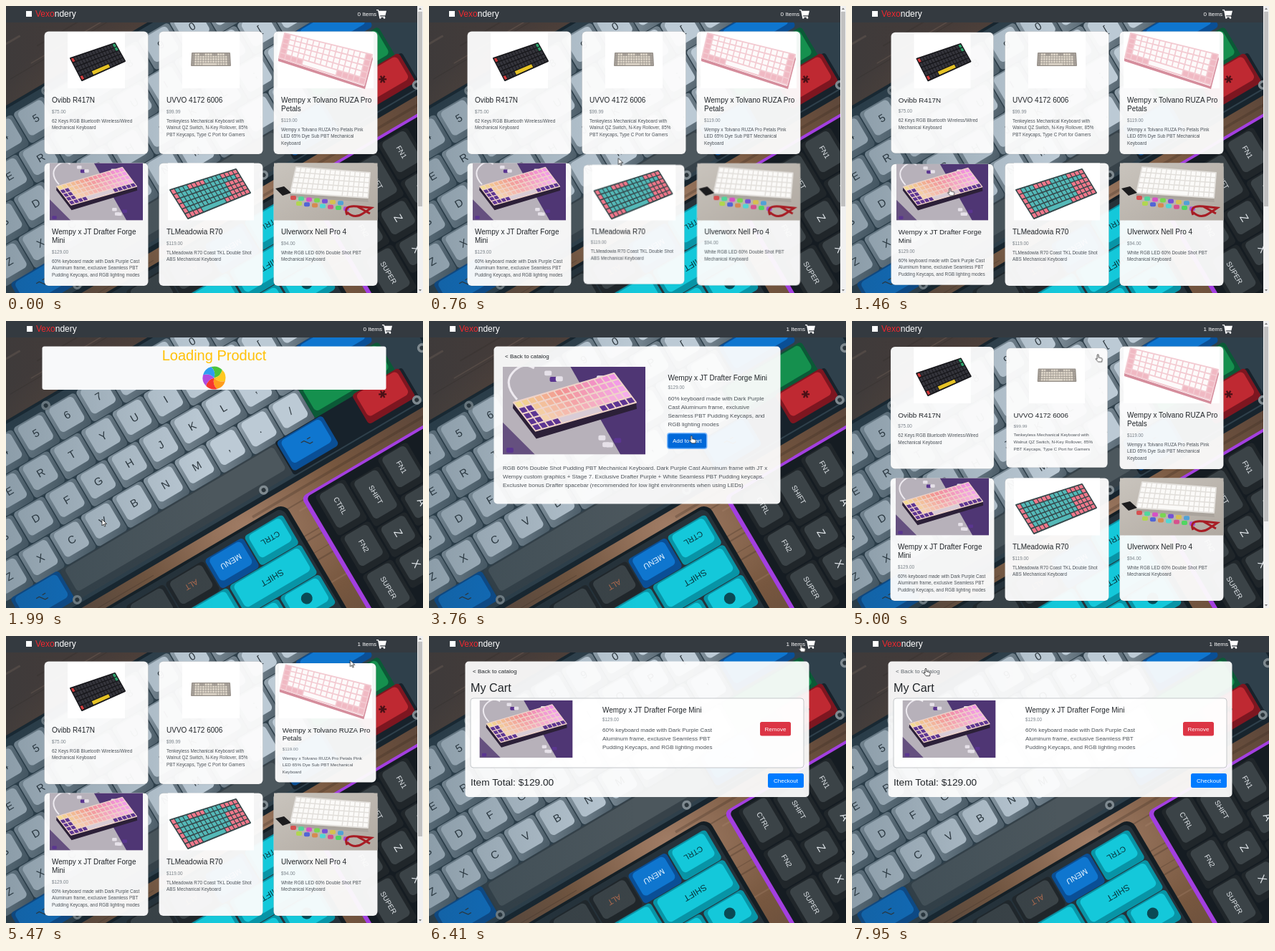
Animation, 582 px wide and 401 px high, one loop 8000 ms. Source, as an HTML page:

```html
<!DOCTYPE html>
<html lang="en">
<head>
<meta charset="utf-8">
<title>Keyboard shop</title>
<style>
  html, body { margin: 0; width: 100%; height: 100%; overflow: hidden; }
  svg { display: block; font-family: "Liberation Sans", Arial, sans-serif; }
  .card { transform-box: fill-box; transform-origin: center; }
  .legend { text-anchor: middle; font-family: "Liberation Sans", "DejaVu Sans", sans-serif; }
</style>
</head>
<body>
<svg id="stage" width="582" height="401" viewBox="0 0 582 401"></svg>
<script>
const LOOP = 8000, ADDED = 3190;
const INK = '#212529', BODY = '#4d5359', MUTED = '#7b838a';

// ---- drawing helpers ----
const rect = (x, y, w, h, fill, r = 0, extra = '') =>
  `<rect x="${x}" y="${y}" width="${w}" height="${h}" rx="${r}" fill="${fill}" ${extra}/>`;
const poly = (points, fill, extra = '') => `<polygon points="${points}" fill="${fill}" ${extra}/>`;
const circle = (x, y, r, fill) => `<circle cx="${x}" cy="${y}" r="${r}" fill="${fill}"/>`;
const text = (x, y, s, size, fill = INK, extra = '') =>
  `<text x="${x}" y="${y}" font-size="${size}" fill="${fill}" ${extra}>${s}</text>`;
const lines = (x, y, step, rows, size, fill) =>
  rows.map((s, i) => text(x, y + i * step, s, size, fill)).join('');
const group = (id, content, cls = '') => `<g id="${id}" class="${cls}">${content}</g>`;
const repeat = (n, draw) => Array.from({ length: n }, (_, i) => draw(i)).join('');
const gradient = (id, from, to) => `<linearGradient id="${id}" x2="1" y2="1">
  <stop stop-color="${from}"/><stop offset="1" stop-color="${to}"/></linearGradient>`;

let seed = 7;
const random = (min, max) => {
  seed = seed * 16807 % 2147483647;
  return +(min + seed / 2147483647 * (max - min)).toFixed(1);
};

// A keyboard seen in perspective: corners run clockwise from the top left.
function board([a, b, c, d], base, paint, rows = 5, cols = 15) {
  const at = (u, v) => [0, 1].map(k =>
    ((1 - v) * ((1 - u) * a[k] + u * b[k]) + v * ((1 - u) * d[k] + u * c[k])).toFixed(1)).join();
  let out = poly([a, b, c, d].join(' '), base, `stroke="${base}" stroke-width="2" stroke-linejoin="round"`);
  for (let r = 0; r < rows; r++) {
    const last = r === rows - 1;
    for (let i = 0; i < cols; i++) {
      const space = last && i === 4, next = space ? 10 : i + 1;
      const u0 = (i + .1) / cols, u1 = (next - .1) / cols, v0 = (r + .1) / rows, v1 = (r + .88) / rows;
      out += poly([at(u0, v0), at(u1, v0), at(u1, v1), at(u0, v1)].join(' '),
        paint({ r, i, last, space, end: next === cols }));
      i = next - 1;
    }
  }
  return out;
}

// ---- desk backdrop, laid out on one tilted grid ----
const PITCH = 50.6;
const GREY = ['url(#greySide)', '#bccad5'], BLUE = ['#0a4f96', '#0f76cf'], TEAL = ['#0894a6', '#14c8da'],
  GREEN = ['#0b5a37', '#15904e'], RED = ['#7d1620', '#bf2932'], DARK = ['#20262a', '#3b4347'];

function key(u, v, w, h, [side, top], label = '', ink = '#2e383f', size = 15, turn = 0) {
  return rect(u - w / 2, v - h / 2, w, h, side, 5) +
    rect(u - w / 2 + 5, v - h / 2 + 2, w - 10, h - 11, top, 6) +
    (label && text(0, size * .36, label, size, ink,
      `class="legend" transform="translate(${u} ${v - 3}) rotate(${turn})"`));
}
function greyBoard() {
  const stagger = [0, .56, .81, 1.36];
  const plate = rect(-260, 120, 750, 279, '#17242d', 10) + rect(-260, 124, 746, 268, '#2f404b', 8);
  const letters = ['1234567890-=', 'QWERTYUIOP[]', "ASDFGHJKL;'", 'ZXCVBNM,./'].map((row, r) =>
    [...row].map((label, i) => key(-246 + (i + stagger[r]) * PITCH, 159 + r * 51.2, 49, 50, GREY, label)).join(''));
  const screw = (u, v) => circle(u, v, 6.5, '#7f8a90') + circle(u, v, 3, '#2c363c');
  return plate + letters.join('') +
    rect(-112, 338, 350, 49, '#374249', 5) + rect(-106, 340, 338, 37, '#4c575d', 5) +
    key(378, 260, 98, 49, BLUE) + key(368, 313, 130, 50, GREEN) + rect(237, 336, 206, 54, '#17222b', 4) +
    key(-153, 361, 78, 48, BLUE, '⌥') + key(276, 361, 74, 48, BLUE, '⌥') +
    key(401, 358, 76, 48, RED, '✱', '#4a1016', 15) +
    screw(-12, 130) + screw(481, 327) + [-112, 190, 438].map(u => screw(u, 386)).join('');
}
function tealBoard() {
  const top = 452, middle = top + 49, bottom = middle + 49;
  return rect(-160, 416, 366, 300, '#141e24', 14) + rect(-154, 420, 354, 290, '#26323a', 10) +
    key(164, top, 62, 48, TEAL, 'CTRL', '#07343c', 11, 180) +
    key(100, top, 62, 48, BLUE, 'MENU', '#e8f4ff', 11, 180) +
    key(36, top, 62, 48, DARK, 'ALT', '#b06b4e', 11, 180) + key(-28, top, 62, 48, DARK) +
    key(138, middle, 116, 48, TEAL, 'SHIFT', '#07343c', 12, 180) + key(46, middle, 62, 48, TEAL) +
    key(165, bottom, 64, 48, TEAL) + circle(165, bottom - 3, 8, '#0a4a55') + key(98, bottom, 64, 48, TEAL);
}
function purpleBoard() {
  let out = rect(230, 421, 400, 400, '#a33fe0', 8) + rect(236, 425, 400, 400, '#151c22', 6);
  [['CTRL', 'FN2', 'SUPER'], ['SHIFT', 'Z', 'X'], ['FN1', 'A', 'S']].forEach((column, c) => {
    let v = 428 + c % 2 * 9;
    column.forEach(label => {
      const h = 44 + 6 * label.length;
      out += key(271 + c * PITCH, v + h / 2, 48, h - 2, DARK, label, '#e3e8ec', label.length > 1 ? 10 : 15, 90);
      v += h;
    });
  });
  return out;
}
const grain = () => repeat(60, i => rect(random(-300, 300), random(-60, 720), random(120, 420), random(1, 4),
  i % 2 ? '#33251f' : '#b08d76', 1, 'opacity=".25"'));
const desk = () => rect(0, 0, 582, 401, 'url(#wood)') +
  `<g transform="rotate(-30.5)">${grain()}${greyBoard()}${tealBoard()}${purpleBoard()}</g>` +
  rect(0, 0, 582, 401, 'url(#shade)');

// ---- product pictures ----
const purplePhoto = rect(0, 0, 200, 123, '#b7b1ba') +
  poly('95,0 200,0 200,123 165,123', '#4f3674') + poly('0,78 45,123 0,123', '#65507f') +
  '<path d="M20 46Q0 24 14 8T44 2" fill="none" stroke="#eeeaf0" stroke-width="3"/>' +
  repeat(9, i => rect(random(5, 190), i % 2 ? random(2, 18) : random(95, 115), 10, 7, i % 3 ? '#e6e1e9' : '#5a3590', 2)) +
  poly('15,50 46,90 187,50 188,59 47,101 14,58', '#2c2038') +
  board([[15, 50], [156, 9], [187, 50], [46, 90]], '#efd3c9', ({ r, i, last, space }) =>
    space ? '#d9ccd6' : last || i < 2 && r > 0 ? '#5d3592' : `hsl(${46 - i * 7} 78% ${76 + r * 2}%)`);

const pictures = [
  rect(86, 36, 80, 79, '#fff') +
    board([[90, 73], [152, 52], [166, 77], [106, 104]], '#17171b', ({ r, i, last, end, space }) =>
      space ? '#e6c326' : i === 0 && (r === 0 || last) ? '#cf3a3c' : end && r < 2 ? '#2fa36b' : '#34343b'),
  rect(246, 36, 80, 79, '#fff') +
    board([[260, 66], [312, 66], [313, 83], [259, 83]], '#97918a', ({ r, i, end }) =>
      end || i < 1 || r === 0 && i % 5 > 2 ? '#aaa39c' : '#ddd5c8'),
  rect(379, 36, 134, 79, '#fff') + poly('380,73 500,112 511,70 512,74 501,116 380,77', '#d58d9c') +
    board([[389, 38], [511, 68], [500, 110], [381, 72]], '#f3cad1', ({ i, end, last, space }) =>
      !space && (last || end || i === 0) ? '#f0b9c3' : '#fdfafa'),
  '<use href="#photo" x="61" y="219.5" width="130" height="80"/>',
  rect(226, 219.5, 120, 80, '#fff') +
    board([[229, 257], [321, 228], [341, 261], [254, 297]], '#34474a', ({ r, i, end, last, space }) =>
      !space && (last || i < 1 || end || (r === 0 && i % 8 > 3) || (i > 11 && r > 1)) ? '#f0788b' : '#54b9b8', 6, 16),
  rect(374, 219.5, 144.5, 80, 'url(#table)') + poly('396,262 505,269 506,274 397,267', '#aaa49d') +
    board([[405, 225], [508, 233], [505, 268], [397, 261]], '#e2dfdb', () => '#fbfaf8') +
    poly('376,255 388,252 398,261 386,265', '#1c1c1e') +
    repeat(14, i => rect(397 + (i >> 1) * 11 + i % 2 * 8, 265 + (i >> 1) * 1.2 + i % 2 * 8, 8, 6, `hsl(${i * 77} 62% 58%)`, 2)) +
    '<path d="M476 292q-6-14 14-12t20 2-12 8-22-2M490 280l18 10" fill="none" stroke="#a71d24" stroke-width="3"/>'
];

const products = [
  [['Ovibb R417N'], '$75.00', ['62 Keys RGB Bluetooth Wireless/Wired', 'Mechanical Keyboard']],
  [['UVVO 4172 6006'], '$99.99', ['Tenkeyless Mechanical Keyboard with', 'Walnut QZ Switch, N-Key Rollover, 85%', 'PBT Keycaps, Type C Port for Gamers']],
  [['Wempy x Tolvano RUZA Pro', 'Petals'], '$119.00', ['Wempy x Tolvano RUZA Pro Petals Pink', 'LED 65% Dye Sub PBT Mechanical', 'Keyboard']],
  [['Wempy x JT Drafter Forge', 'Mini'], '$129.00', ['60% keyboard made with Dark Purple Cast', 'Aluminum frame, exclusive Seamless PBT', 'Pudding Keycaps, and RGB lighting modes']],
  [['TLMeadowia R70'], '$119.00', ['TLMeadowia R70 Coast TKL Double Shot', 'ABS Mechanical Keyboard']],
  [['Ulverworx Nell Pro 4'], '$94.00', ['White RGB LED 60% Double Shot PBT', 'Mechanical Keyboard']]
];
const cardBox = i => [53.5 + i % 3 * 160, i < 3 ? 35.5 : 219.5, 145, 171.5];
function card([title, price, about], i) {
  const [x, y, w, h] = cardBox(i), drop = (title.length - 1) * 12;
  return group('card' + i,
    rect(x, y, w, h, 'rgba(252,252,252,.96)', 6, 'stroke="rgba(0,0,0,.15)" stroke-width=".6"') + pictures[i] +
    lines(x + 10.5, y + 99.5, 12, title, 10, INK) + text(x + 10.5, y + 114 + drop, price, 6.4, MUTED) +
    lines(x + 10.5, y + 127 + drop, 9.8, about, 6.4, BODY), 'card');
}

// ---- page parts ----
const trolley = x => `<g transform="translate(${x} 5)" fill="#fff"><path d="M0 0h2.8l.6 1.8H14l-1.6 6.4H5l.3 1.4h6.6v1.2H4L2 1.3H0z"/>` +
  circle(5.3, 11.4, 1.3, '#fff') + circle(11, 11.4, 1.3, '#fff') + '</g>';
const header = (x, shift, width) => rect(0, 0, width, 23, '#343a40') + rect(x - 13, 7, 8, 8, '#fff') +
  text(x, 15, '<tspan fill="#f0282f">Vexo</tspan>ndery', 12, '#fff') +
  [0, 1].map(n => `<g class="count${n}">${text(490.5 + shift, 13.8, n + ' Items', 8.1, '#fff')}</g>`).join('') +
  trolley(517 + shift);
const panel = (x, w, h, alpha) => rect(x, 35.5, w, h, `rgba(253,253,253,${alpha})`, 5);
const button = (x, y, w, h, label, fill, id = '') =>
  rect(x, y, w, h, fill, 2.5, id && `id="${id}"`) + text(x + w / 2, y + h / 2 + 2.8, label, 8, '#fff', 'text-anchor="middle"');
const backLink = (x, id) => text(x, 52, '&lt; Back to catalog', 8, INK, `id="${id}"`);

function wheel(x, y, r) {
  const point = (deg, d) => [d * Math.cos(deg * Math.PI / 180), d * Math.sin(deg * Math.PI / 180)].map(n => n.toFixed(2)).join(' ');
  const colors = ['#4cc43a', '#ffc81f', '#ff9d1c', '#f5372f', '#b04be0', '#2f9df0'];
  return `<g transform="translate(${x} ${y})">` + colors.map((c, i) => {
    const from = -105 + i * 60, to = from + 60;
    return `<path fill="${c}" d="M0 0Q${point(from + 32, r * .6)} ${point(from, r)}A${r} ${r} 0 0 1 ${point(to, r)}Q${point(to + 32, r * .6)} 0 0z"/>`;
  }).join('') + '</g>';
}
const loading = label => header(42, 8, 582) + rect(50.5, 35.5, 480, 60.5, '#f8f9fa', 3) +
  text(290.5, 54.5, label, 20, '#ffc107', 'text-anchor="middle"') + wheel(290.5, 79.5, 16);

const catalog = header(41, 0, 574) + products.map(card).join('') +
  rect(574, 0, 8, 401, '#f1f1f1') + rect(575, 8, 6, 272, '#c1c1c1') +
  poly('576,5 580,5 578,2.5', '#777') + poly('576,396 580,396 578,398.5', '#777');

const [chosenTitle, chosenPrice, chosenAbout] = products[3];
const name = chosenTitle.join(' ');
const product = header(42, 8, 582) + panel(90.5, 400, 220, .95) + backLink(106, 'productBack') +
  '<use href="#photo" x="103" y="64" width="199" height="122.5"/>' +
  text(333.5, 83, name, 10) + text(333.5, 95, chosenPrice, 6.4, MUTED) +
  lines(333.5, 110.5, 12.2, ['60% keyboard made with Dark Purple', 'Cast Aluminum frame, exclusive', 'Seamless PBT Pudding Keycaps, and', 'RGB lighting modes'], 8, BODY) +
  rect(332, 156, 56.5, 23, 'rgba(0,123,255,.5)', 4, 'id="ring"') + button(333.5, 157.5, 53.5, 20, 'Add to Cart', '#007bff', 'add') +
  lines(103, 207.5, 12.2, ['RGB 60% Double Shot Pudding PBT Mechanical Keyboard. Dark Purple Cast Aluminum frame with JT x',
    'Wempy custom graphics + Stage 7. Exclusive Drafter Purple + White Seamless PBT Pudding keycaps.',
    'Exclusive bonus Drafter spacebar (recommended for low light environments when using LEDs)'], 8, BODY);

const cart = header(42, 8, 582) + panel(50.5, 480, 189.5, .94) + backLink(61, 'cartBack') + text(58, 78, 'My Cart', 16.2) +
  rect(58, 87, 465, 97, 'rgba(255,255,255,.9)', 4, 'stroke="#c4c7ca" stroke-width="1"') +
  '<use href="#photo" x="70.5" y="90" width="130" height="80"/>' +
  text(242, 106.8, name, 10) + text(242, 119, chosenPrice, 6.4, MUTED) + lines(242, 133.8, 12.2, chosenAbout, 8, BODY) +
  button(462, 120, 43, 19.5, 'Remove', '#dc3545') + text(58, 209, 'Item Total: ' + chosenPrice, 13.7) +
  button(473, 192, 50, 20, 'Checkout', '#007bff');

const pointer = group('pointer', '<g stroke="#222" stroke-width=".8" fill="#fff">' +
  '<path id="hand" d="M-1 1q1-1.6 2 0v3.6l3.9.9q1.3.4 1.2 2l-.7 3.3h-5l-3.6-4q.2-1.5 2.2 0z"/>' +
  '<path id="arrow" d="M0 0v9l2.1-2 1.5 3.2 1.4-.7-1.5-3h3z"/></g>');

document.getElementById('stage').innerHTML = `<defs>
  <radialGradient id="wood" cx=".58" cy=".72" r=".75"><stop stop-color="#a17d66"/><stop offset=".4" stop-color="#77573f"/><stop offset="1" stop-color="#4d3d37"/></radialGradient>
  ${gradient('greySide', '#93a2ad', '#4f5f6a')}${gradient('table', '#c9c4bd', '#b0a9a1')}
  <linearGradient id="shade"><stop stop-color="#1c3442" stop-opacity=".3"/><stop offset=".5" stop-color="#1c3442" stop-opacity="0"/></linearGradient>
  <symbol id="photo" viewBox="0 0 200 123" preserveAspectRatio="none">${purplePhoto}</symbol></defs>` +
  desk() + group('catalog', catalog) + group('loadOne', loading('Loading Product')) +
  group('product', product) + group('loadAll', loading('Loading Products!')) + group('cart', cart) + pointer;

// ---- timeline: pages by start time, pointer moves as start, end, x, y ----
const pages = [['catalog', 0], ['loadOne', 1890], ['product', 2040], ['loadAll', 4570], ['catalog', 4760], ['cart', 5990]];
const entry = [556, 398];
const moves = [
  [390, 1180, 150, 140], [1230, 1620, 134, 277], [2230, 2650, 382, 164], [2790, 2930, 375, 164], [3748, 4510, 120, 47],
  [4760, 5340, 459, 46], [5380, 5850, 520, 11], [6410, 7200, 209, 168], [7250, 7430, 136, 167], [7570, 7950, 103, 45]
];
const pageAt = t => pages.findLast(([, start]) => start <= t)[0];
const pointerAt = t => moves.reduce(([x, y], [start, end, toX, toY]) => {
  const p = Math.min(1, Math.max(0, (t - start) / (end - start))), e = p * (2 - p);
  return [x + (toX - x) * e, y + (toY - y) * e];
}, entry);

// Time ranges in which a test on the time holds.
function spansWhere(test, step = 10) {
  const spans = [];
  for (let t = 0; t < LOOP; t += step) {
    if (!test(t)) continue;
    if (spans.length && spans.at(-1)[1] === t) spans.at(-1)[1] = t + step;
    else spans.push([t, t + step]);
  }
  return spans;
}
const over = (page, [x, y, w, h]) => t => {
  const [px, py] = pointerAt(t);
  return pageAt(t) === page && px >= x && px <= x + w && py >= y && py <= y + h;
};
const overCard = products.map((_, i) => over('catalog', cardBox(i)));
const overAdd = over('product', [333.5, 157.5, 53.5, 20]);
const overProductBack = over('product', [106, 44, 61, 12]), overCartBack = over('cart', [61, 44, 61, 12]);
const overTrolley = ['catalog', 'cart'].map(page => over(page, [490, 2, 50, 20]));
const clickable = [...overCard, ...overTrolley, overAdd, overProductBack, overCartBack];

// ---- motion ----
function play(target, prop, steps, easing = 'linear') {
  if (!steps.length) return;
  const table = [...steps];
  if (table[0][0] > 0) table.unshift([0, table[0][1]]);
  if (table.at(-1)[0] < LOOP) table.push([LOOP, table.at(-1)[1]]);
  const frames = table.map(([t, value]) => ({ offset: t / LOOP, [prop]: value, easing }));
  document.querySelectorAll(target).forEach(el => el.animate(frames, { duration: LOOP, iterations: Infinity }));
}
function swap(target, prop, off, on, spans) {
  const steps = spans.flatMap(([from, to]) => [[from, on], [to, off]]);
  if (steps.length && steps[0][0] > 0) steps.unshift([0, off]);
  play(target, prop, steps, 'steps(1)');
}
const show = (target, spans) => swap(target, 'opacity', 0, 1, spans);

new Set(pages.map(([id]) => id)).forEach(id => show('#' + id, spansWhere(t => pageAt(t) === id)));
show('.count0', [[0, ADDED]]);
show('.count1', [[ADDED, LOOP]]);
show('#ring', [[ADDED, LOOP]]);
swap('#add', 'fill', '#007bff', '#0069d9', spansWhere(overAdd));
swap('#productBack', 'fill', INK, '#5f666c', spansWhere(overProductBack));
swap('#cartBack', 'fill', INK, '#5f666c', spansWhere(overCartBack));

const handSpans = spansWhere(t => clickable.some(test => test(t)));
show('#pointer', [[moves[0][0], LOOP]]);
show('#hand', handSpans);
swap('#arrow', 'opacity', 1, 0, handSpans);

// This curve is the same quadratic ease-out as in pointerAt.
play('#pointer', 'transform', moves.flatMap(([start, end]) => [start, end]).map(t =>
  [t, `translate(${pointerAt(t).map(n => n + 'px')})`]), 'cubic-bezier(.3333,.6667,.6667,1)');

// Cards shrink under the pointer, 200 ms each way.
overCard.forEach((test, i) => play('#card' + i, 'transform', spansWhere(test).flatMap(([from, to]) => [
  [from, 'scale(1)'], [Math.min(from + 200, to), 'scale(.97)'], [to, 'scale(.97)'], [to + 200, 'scale(1)']
])));
</script>
</body>
</html>
```
